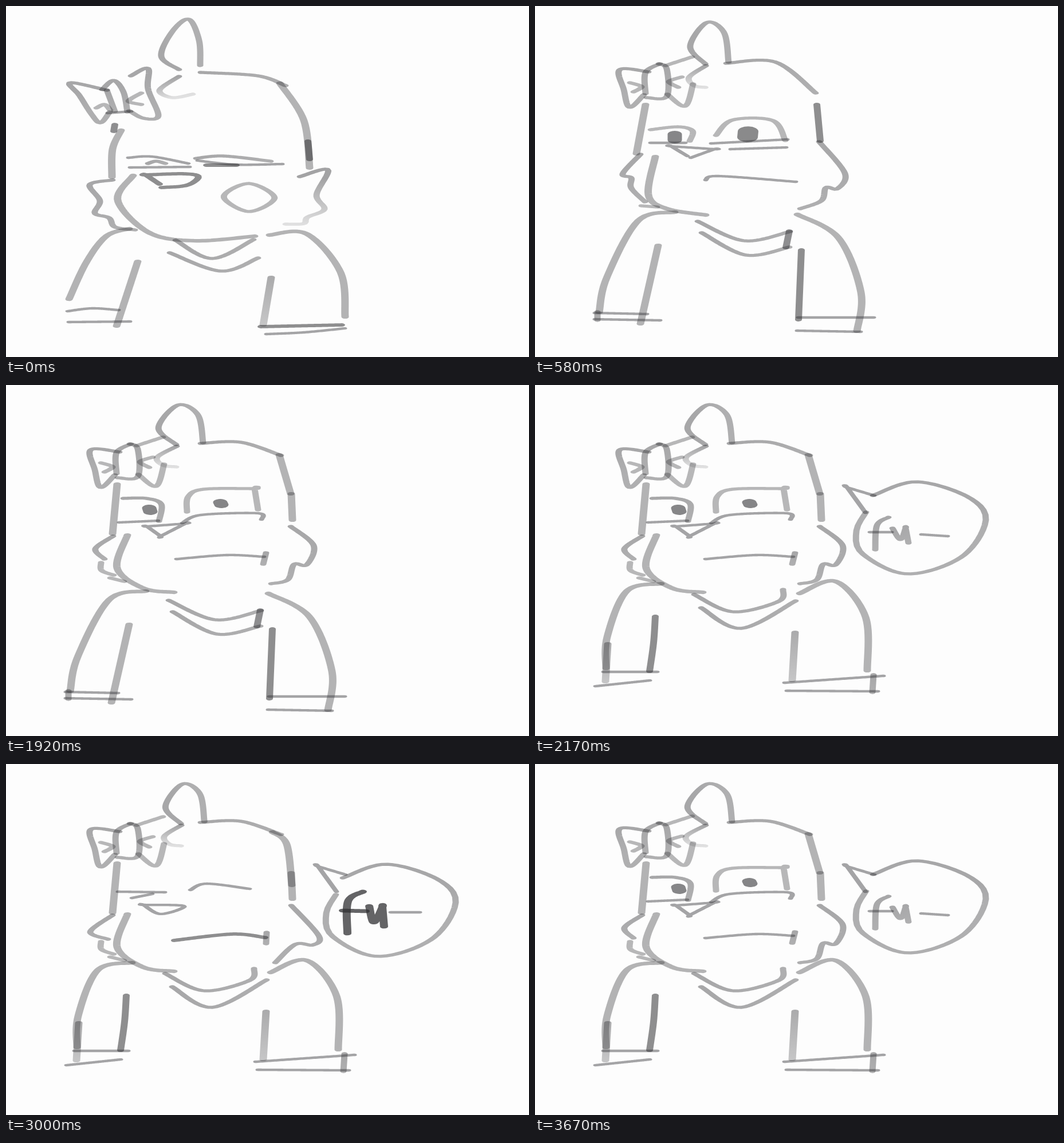
These frames come from a looping animation (913 px wide and 613 px high, 5.08 s). An HTML page with a canvas:

```html
<!DOCTYPE html>
<html lang="en">
<head>
<meta charset="utf-8">
<title>Grumpy sketch</title>
<style>
html, body { margin: 0; width: 100%; height: 100%; overflow: hidden; background: #fdfdfd; }
canvas { display: block; }
</style>
</head>
<body>
<canvas id="stage" width="913" height="613"></canvas>
<script>
const ctx = document.getElementById('stage').getContext('2d');
const LOOP = 5080, BEAT = 83.3, SAMPLES = 64, NIB = 0.48;
const mix = (a, b, t) => a + (b - a) * t;
const ink = a => `rgba(48,48,51,${a})`;

// Brushes: width, opacity at the start and at the end.
const pen = (w, a, b = a) => ({ w, a, b });
const pens = {
  m: pen(11, .42, .38), d: pen(12, .54), l: pen(11, .34), t: pen(9, .43), f: pen(11, .44, .14),
  g: pen(13, .36), u: pen(13, .4, .27), p: pen(25, .58), q: pen(36, .56), b: pen(14, .74)
};

// One stroke per line: a brush, then its points.
const part = text => text.trim().split('\n').map(line => {
  const [key, ...xy] = line.trim().split(' ');
  const pts = [];
  while (xy.length) pts.push(xy.splice(0, 2).map(Number));
  return { ...pens[key], pts: resample(spline(pts)) };
});

const warp = (strokes, sx, sy, dx, dy) => strokes.map(s => (
  { ...s, pts: s.pts.map(([x, y]) => [x * sx + dx, y * sy + dy]) }));
const shift = (strokes, dx, dy) => warp(strokes, 1, 1, dx, dy);

// Smooth curve through the points; a doubled point makes a corner.
function spline(p) {
  const n = p.length - 1, out = [p[0]];
  const closed = String(p[0]) === String(p[n]);
  const before = closed ? p[n - 1] : p[0], after = closed ? p[1] : p[n];
  for (let i = 0; i < n; i++) {
    const q = [p[i - 1] || before, p[i], p[i + 1], p[i + 2] || after];
    for (let s = 1; s <= 12; s++) {
      const t = s / 12;
      out.push([0, 1].map(k => {
        const [a, b, c, d] = q.map(v => v[k]);
        return b + t / 2 * (c - a + t * (2 * a - 5 * b + 4 * c - d + t * (3 * (b - c) + d - a)));
      }));
    }
  }
  return out;
}

function resample(p) {
  const len = [0];
  for (let i = 1; i < p.length; i++) {
    len.push(len[i - 1] + Math.hypot(p[i][0] - p[i - 1][0], p[i][1] - p[i - 1][1]));
  }
  const out = [];
  for (let n = 0, i = 1; n < SAMPLES; n++) {
    const d = len[len.length - 1] * n / (SAMPLES - 1);
    while (i < p.length - 1 && len[i] < d) i++;
    const t = (d - len[i - 1]) / (len[i] - len[i - 1] || 1);
    out.push([0, 1].map(k => mix(p[i - 1][k], p[i][k], t)));
  }
  return out;
}

const leaning = {};
leaning.ear = part(`m 302 111 271 88 290 45 319 23 337 60 339 104
  f 302 123 268 147 290 160 326 154`);
leaning.bow = part(`m 176 147 112 134 128 156 150 190 165 204 181 185
  l 158 178 172 172 182 182
  m 168 146 188 130 205 150 212 185
  m 176 147 190 184
  m 218 122 248 109 248 145 266 192 240 196 215 183
  l 236 152 214 166 236 172
  t 178 187 218 184`);
leaning.head = part(`g 201 217 186 250 185 299
  m 340 116 440 122 488 139
  g 478 135 520 200 530 283
  m 186 304 146 312 164 340 155 362 180 370 190 386 225 391
  g 222 296 195 340 250 396 330 410 434 402
  f 513 298 562 286 542 330 556 355 526 369 520 380 488 381
  d 527 236 530 268
  d 190 207 188 219`);
leaning.eyes = part(`t 214 265 255 263 318 275
  m 332 266 380 262 462 271
  t 217 282 320 281
  t 335 270 400 277 482 276
  m 248 275 262 271 278 275
  d 350 278 402 278`);
leaning.face = part(`d 268 311 244 295 244 295 310 293 336 298 316 313 272 317
  l 424 310 380 333 424 359 469 335 424 310`);
leaning.body = part(`g 215 389 175 402 140 448 110 512
  g 230 446 193 559
  t 108 533 150 528 196 531
  t 110 552 216 551
  m 296 409 360 441 432 408
  m 286 431 375 463 440 440
  g 460 400 525 398 584 465 592 543
  d 445 560 586 557
  t 455 573 520 570 591 563
  u 463 474 449 557`);

const squashed = {};
squashed.ear = part(`m 300 150 268 125 291 94 348 139
  f 304 152 272 172 285 195 324 192`);
squashed.bow = part(`m 182 164 130 164 140 200 147 232 180 222
  l 150 190 178 192 165 208
  d 212 157 185 160 184 212 215 215
  m 213 165 216 213
  l 215 162 262 143 282 200 275 222 216 212
  l 255 170 222 188 258 195`);
squashed.head = part(`d 162 236 146 292
  m 346 140 410 140 468 157
  g 466 157 507 205 531 271
  m 152 294 118 304 132 326 122 345 147 356
  g 194 313 168 358 210 382 290 382
  m 535 273 577 301 540 326 557 355 525 366 488 372
  u 513 238 515 256
  l 136 362 180 364`);
squashed.eyes = part(`t 195 289 312 292
  t 344 285 524 290`);
squashed.face = part(`t 268 317 230 304 230 304 350 311 350 311 268 317
  t 374 347 495 344 495 344 486 337 374 347`);
squashed.body = part(`u 195 386 160 383 110 425 75 500
  g 194 414 157 521
  t 75 518 120 514 182 521
  t 70 525 120 530 180 520
  m 264 400 330 431 422 408
  m 272 410 335 446 450 411
  g 465 388 545 390 607 460 616 537
  t 450 545 609 537
  t 452 546 598 545`);

const staring = {};
staring.ear = part(`m 297 104 266 75 300 35 335 52 344 101
  f 298 107 264 126 274 140 297 143`);
staring.bow = part(`m 198 117 148 113 155 148 165 179 190 157
  l 166 136 186 143 172 152
  m 218 103 193 118 193 155
  m 216 103 230 112 230 160 195 162
  l 228 106 274 91
  l 256 126 234 134 250 144
  l 231 156 262 177 276 138`);
staring.head = part(`g 194 173 186 260
  m 340 102 410 100 480 123
  g 477 122 497 190
  m 187 264 156 286 172 304
  g 212 262 194 320 240 355 293 362
  m 497 247 537 280 525 314 503 313 492 340 463 347
  g 498 190 500 236
  l 166 310 167 324 188 332
  l 182 337 206 343`);
staring.eyes = part(`m 205 198 245 198 271 208 267 238
  l 316 222 318 195 345 182 434 181 434 181 440 218
  t 198 240 265 237
  t 308 241 340 227 440 224 446 235
  p 250 215 252 221
  p 374 205 376 209`);
staring.face = part(`t 246 247 246 247 313 242 313 242 270 264 270 264 246 247
  t 298 304 385 297 450 300
  m 454 293 449 313`);
staring.body = part(`g 244 360 180 375 125 475 112 535
  g 215 418 184 555
  t 105 536 195 538
  t 105 547 218 549
  m 284 376 365 410 445 394
  m 291 396 368 435 444 421
  g 458 364 530 405 569 500 562 568
  t 460 544 591 544
  t 458 567 568 569
  d 465 426 460 548
  d 444 393 438 422
  m 109 534 109 549`);

const raised = { body: staring.body };
raised.ear = warp(staring.ear, .86, 1.05, 42, -8);
raised.bow = shift(staring.bow, 0, -2);
raised.head = part(`g 193 172 177 258
  m 334 100 420 98 490 152
  d 492 172 498 236
  m 184 259 153 293 168 300 168 318 192 342
  g 210 263 198 330 230 354 298 365
  m 496 237 541 292 528 319 508 317 500 340 463 354
  l 186 349 213 351`);
raised.eyes = part(`l 202 216 250 211 275 218 270 236
  l 316 226 345 199 415 200 437 235
  t 202 239 262 239
  t 308 240 440 233
  p 244 224 244 234
  q 372 219 371 229
  t 342 250 438 247`);
raised.face = part(`t 266 262 238 245 238 245 313 250 313 250 272 265
  t 298 304 320 297 455 307`);

const speaking = { ...staring };
speaking.body = part(`g 220 347 160 360 126 440 124 495
  d 210 404 207 450 200 500
  t 120 501 213 501
  t 106 526 200 516
  m 278 366 345 396 425 378 433 357
  m 290 389 360 425 455 377
  g 462 364 525 343 577 405 580 499
  t 436 520 608 508
  t 440 534 598 535
  u 454 432 449 516
  u 127 452 123 518
  m 591 506 589 537`);
speaking.bubble = part(`t 592 193 545 179 545 179 577 223
  m 590 193 665 169 755 195 787 236 745 300 650 330 572 295 561 255 578 222
  m 617 231 597 245 594 288
  t 585 257 622 257
  m 624 250 638 270 647 250 647 250 652 276
  t 675 261 720 264`);

const blinking = { ...speaking };
blinking.ear = warp(staring.ear, .873, 1, 46, 0);
blinking.bow = shift(staring.bow, 0, 1);
blinking.head = [...staring.head];
[blinking.head[2], blinking.head[3], blinking.head[5]] = part(`g 465 119 490 140 499 212
  m 186 264 147 293 178 306
  m 498 247 546 300 536 316 505 315 470 347`);
blinking.eyes = part(`t 196 223 277 224
  t 322 220 350 209 425 218
  t 220 234 255 227`);
blinking.face = part(`t 240 246 240 246 311 248 270 262 240 246
  d 294 308 395 297 452 303
  m 455 294 454 314`);
blinking.bubble = [
  speaking.bubble[0],
  ...shift([speaking.bubble[1]], -2, 6),
  ...part(`b 623 223 597 240 596 296
    b 588 256 628 257
    b 634 248 642 277 657 250 657 250 660 284
    t 672 259 722 259`)
];

// Stepped moves: start, from, to, steps taken, steps for the whole way.
const moves = [
  [0, leaning, squashed, 2, 9],
  [330, squashed, raised, 3, 3],
  [580, raised, staring, 3, 3],
  [2170, speaking, speaking, 0, 1],
  [2747, speaking, blinking, 3, 3],
  [3087, blinking, speaking, 7, 7]
];

function blend(s, e, t) {
  if (!s || !e) return t < .5 ? s : e;
  return {
    w: mix(s.w, e.w, t), a: mix(s.a, e.a, t), b: mix(s.b, e.b, t),
    pts: s.pts.map((p, i) => p.map((v, k) => mix(v, e.pts[i][k], t)))
  };
}

// The flat nib makes upright lines wide and level lines thin.
function brush({ w, a, b, pts }) {
  const [x0, y0] = pts[0], [x1, y1] = pts[pts.length - 1];
  ctx.save();
  ctx.beginPath();
  for (const [x, y] of pts) ctx.lineTo(x, y);
  ctx.scale(1, NIB);
  ctx.lineWidth = w;
  ctx.lineCap = ctx.lineJoin = 'round';
  ctx.strokeStyle = ink((a + b) / 2);
  if (a !== b && Math.hypot(x1 - x0, y1 - y0) > 8) {
    const g = ctx.createLinearGradient(x0, y0 / NIB, x1, y1 / NIB);
    g.addColorStop(0, ink(a));
    g.addColorStop(1, ink(b));
    ctx.strokeStyle = g;
  }
  ctx.stroke();
  ctx.restore();
}

function draw(from, to, t) {
  ctx.fillStyle = '#fdfdfd';
  ctx.fillRect(0, 0, 913, 613);
  for (const name of ['body', 'head', 'ear', 'bow', 'eyes', 'face', 'bubble']) {
    const s = from[name] || [], e = to[name] || [];
    for (let i = 0; i < Math.max(s.length, e.length); i++) {
      const stroke = blend(s[i], e[i], t);
      if (stroke) brush(stroke);
    }
  }
}

const begin = performance.now();
function tick() {
  const time = (performance.now() - begin) % LOOP;
  const [start, from, to, taken, whole] = moves.filter(m => m[0] <= time).pop();
  draw(from, to, Math.min(taken, Math.floor((time - start + 4) / BEAT)) / whole);
  requestAnimationFrame(tick);
}
tick();
</script>
</body>
</html>
```
